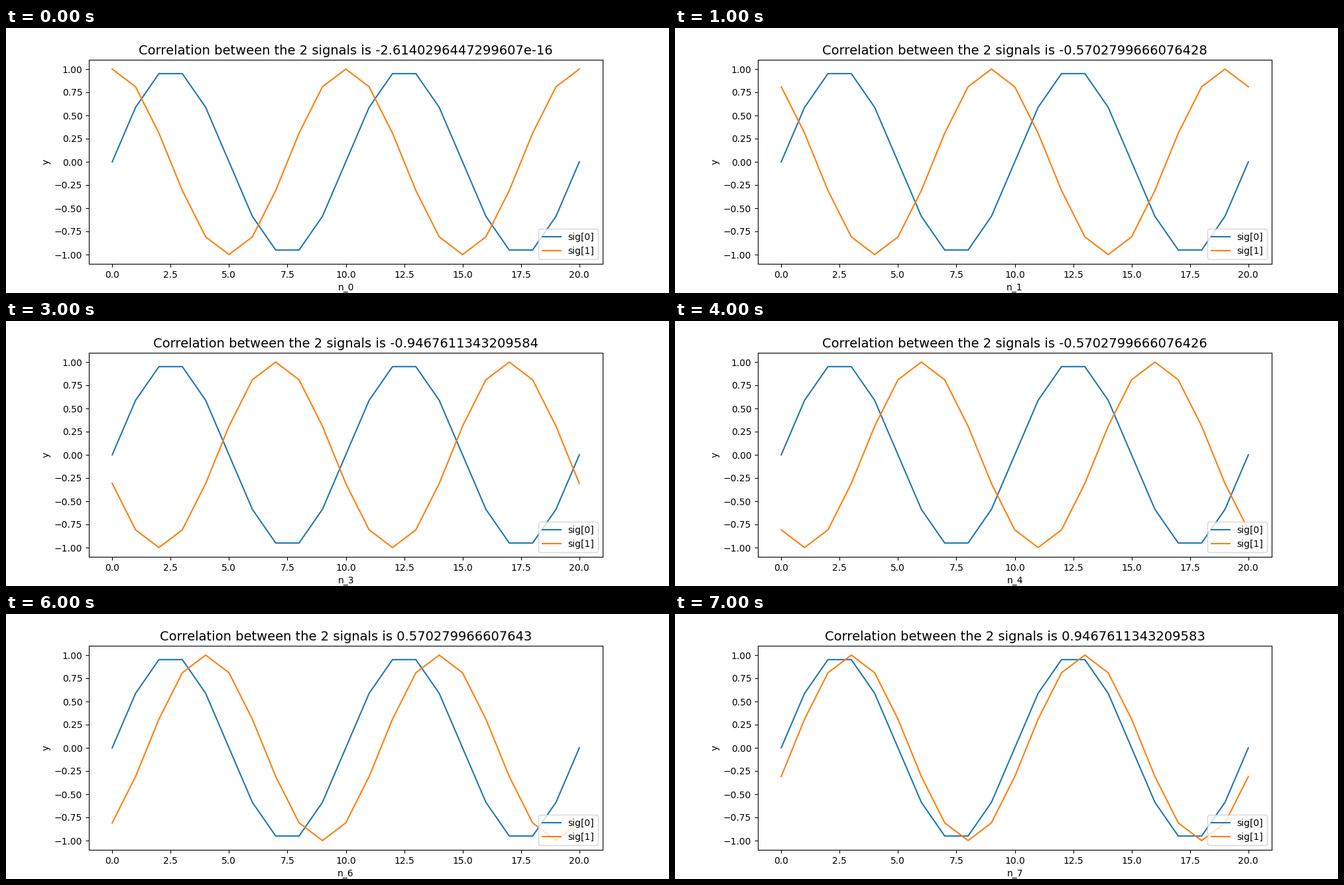
Write a matplotlib script that moves like this. It is 1000 by 400 pixels and loops after 8 s.

```python
import numpy as np
import matplotlib.pyplot as plt
from matplotlib.animation import FuncAnimation

PERIOD = 10
LOOP_MS = 8000
# Kept as text: the last digits depend on floating-point rounding.
CORRELATIONS = [
    "-2.6140296447299607e-16",
    "-0.5702799666076428",
    "-0.9467611343209584",
    "-0.9467611343209584",
    "-0.5702799666076426",
    "1.3940465870515132e-16",
    "0.570279966607643",
    "0.9467611343209583",
]

plt.rcParams["font.family"] = "DejaVu Sans"
fig, ax = plt.subplots(figsize=(10, 4), dpi=100)

n = np.arange(21)
ax.plot(n, np.sin(2 * np.pi * n / PERIOD), color="tab:blue", label="sig[0]")
shifted, = ax.plot(n, np.cos(2 * np.pi * n / PERIOD), color="tab:orange",
                   label="sig[1]")
ax.set_xlim(-1, 21)
ax.set_ylim(-1.1, 1.1)
ax.set_ylabel("y")
ax.legend(loc="lower right")


def update(shift):
    shifted.set_ydata(np.cos(2 * np.pi * (n + shift) / PERIOD))
    ax.set_xlabel(f"n_{shift}")
    ax.set_title(f"Correlation between the 2 signals is {CORRELATIONS[shift]}",
                 fontsize=14)
    return [shifted]


anim = FuncAnimation(fig, update, frames=len(CORRELATIONS),
                     interval=LOOP_MS // len(CORRELATIONS),
                     repeat=True, repeat_delay=0, blit=False)
plt.show()
```
